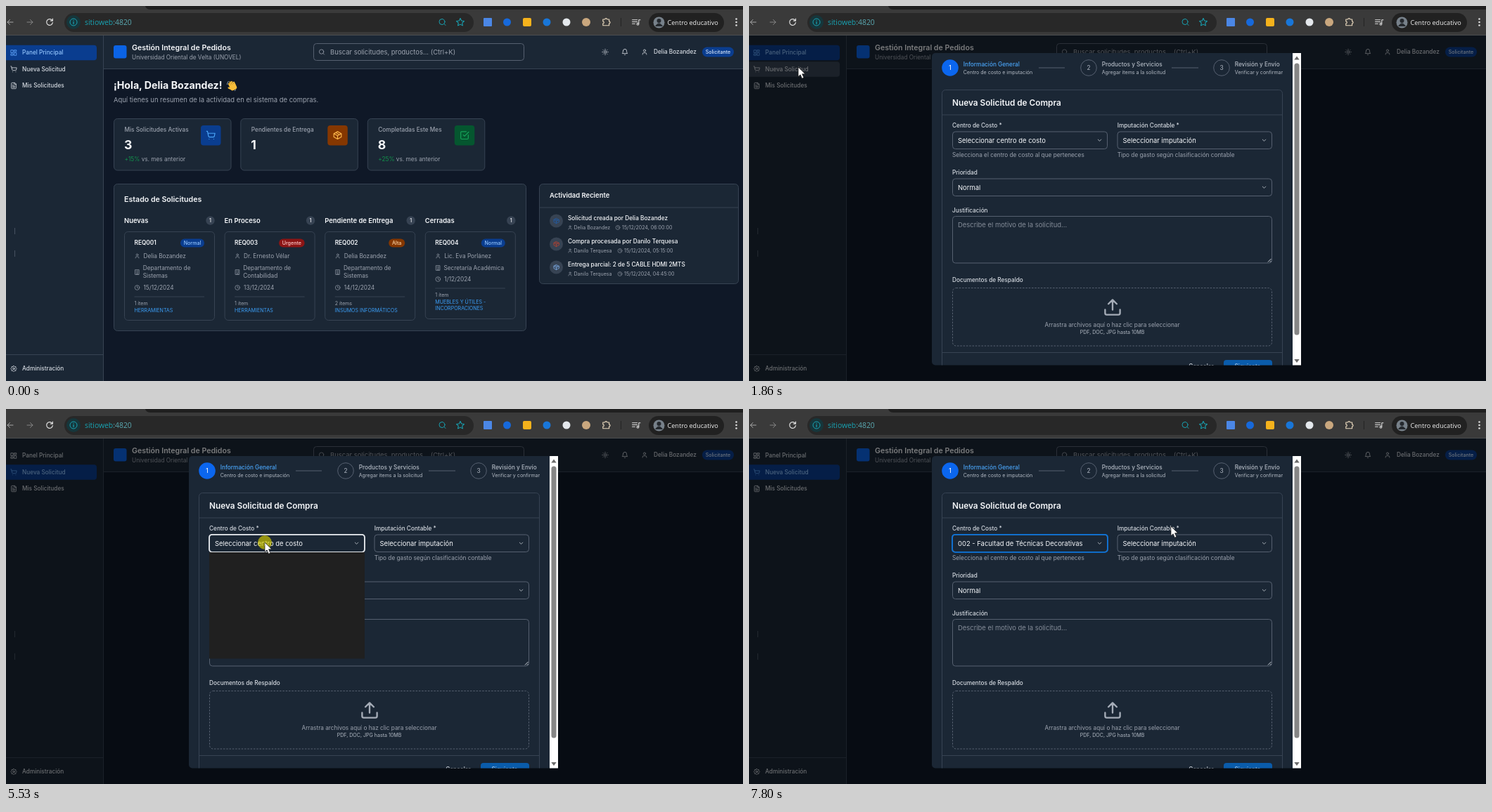
An HTML page for the animation above (8 s loop, 1048 by 534 pixels).

```html
<!DOCTYPE html>
<html lang="es">
<head>
<meta charset="utf-8">
<title>Panel de solicitudes</title>
<style>
  html, body { margin: 0; width: 100%; height: 100%; overflow: hidden; background: #0f1827; }
  svg { display: block; width: 100vw; height: 100vh; }
  text { font-family: Inter, sans-serif; white-space: pre; }
  .chrome text { font-family: "Open Sans", "Noto Sans", sans-serif; }
</style>
</head>
<body>
<svg id="stage" viewBox="0 0 1048 534"></svg>
<script>
const LOOP = 8000;
const PANEL = '#1b2735', LINE = '#374353', FIELD = '#566070', WHITE = '#f5f7fa', SOFT = '#d5dae1',
  GRAY = '#9ca3af', BLUE = '#0a3d8f', SKY = '#93c5fd', LINK = '#3b9df5', BROWN = '#853700', TEAL = '#18a3b3';
const XS = 7.08, SM = 8.26, MD = 9.44, LG = 10.62, XL = 11.8;
const USER = 'Delia Bozandez', BUYER = 'Danilo Terquesa', FACULTY = '002 - Facultad de Técnicas Decorativas';

// Line icons on a 24-unit grid.
const ICONS = {
  grid: 'M3 3h7v9H3zM14 3h7v5h-7zM14 12h7v9h-7zM3 16h7v5H3z',
  cart: 'M2 2h2l2.7 12.4a2 2 0 0 0 2 1.6h9.8a2 2 0 0 0 2-1.6L22 7H5.1M8 21h.1M19 21h.1',
  file: 'M15 2H6a2 2 0 0 0-2 2v16a2 2 0 0 0 2 2h12a2 2 0 0 0 2-2V7zM14 2v5h6M8 9h2M8 13h8M8 17h8',
  gear: 'M12 2l3 3h4v4l3 3-3 3v4h-4l-3 3-3-3H5v-4l-3-3 3-3V5h4zM15 12a3 3 0 1 1-6 0 3 3 0 0 1 6 0z',
  search: 'M19 11a8 8 0 1 1-16 0 8 8 0 0 1 16 0zM21 21l-4.3-4.3',
  sun: 'M16 12a4 4 0 1 1-8 0 4 4 0 0 1 8 0zM12 2v2M12 20v2M2 12h2M20 12h2M5 5l1.4 1.4M17.6 17.6L19 19M6.4 17.6L5 19M19 5l-1.4 1.4',
  bell: 'M6 8a6 6 0 0 1 12 0c0 7 3 9 3 9H3s3-2 3-9M10.3 21a1.9 1.9 0 0 0 3.4 0',
  user: 'M19 21v-2a4 4 0 0 0-4-4H9a4 4 0 0 0-4 4v2M16 7a4 4 0 1 1-8 0 4 4 0 0 1 8 0z',
  box: 'M21 8l-9-5-9 5v8l9 5 9-5zM3.3 8l8.7 5 8.7-5M12 21v-8M7.5 5.5l9 5',
  check: 'M21 11v8a2 2 0 0 1-2 2H5a2 2 0 0 1-2-2V5a2 2 0 0 1 2-2h11M9 11l3 3L22 4',
  building: 'M4 2h16v20H4zM9 22v-4h6v4M8 6h.1M12 6h.1M16 6h.1M8 10h.1M12 10h.1M16 10h.1M8 14h.1M12 14h.1M16 14h.1',
  clock: 'M22 12a10 10 0 1 1-20 0 10 10 0 0 1 20 0zM12 6v6l4 2',
  upload: 'M21 15v4a2 2 0 0 1-2 2H5a2 2 0 0 1-2-2v-4M17 8l-5-5-5 5M12 3v12',
  chevron: 'M6 9l6 6 6-6',
  back: 'M20 12H4m7 7l-7-7 7-7',
  forward: 'M4 12h16m-7-7l7 7-7 7',
  reload: 'M20 13a8 8 0 1 1-2.3-6.7L20 8.5M20 3v5.5h-5.5',
  star: 'M12 2l3.1 6.3 6.9 1-5 4.9 1.2 6.8-6.2-3.2L5.8 21 7 14.2 2 9.3l6.9-1z',
  list: 'M2 6h13M2 11h13M2 16h7M19 17V6h4M19 17a2.5 2.5 0 1 1-5 0 2.5 2.5 0 0 1 5 0z',
  puzzle: 'M4 6h5a2.5 2.5 0 0 1 5 0h5v5a2.5 2.5 0 0 1 0 5v5H4v-5a2.5 2.5 0 0 0 0-5z',
};

const rect = (x, y, w, h, fill, r = 0, stroke = 'none', more = '') =>
  `<rect x="${x}" y="${y}" width="${w}" height="${h}" rx="${r}" fill="${fill}" stroke="${stroke}" ${more}/>`;
const circle = (x, y, r, fill, stroke = 'none') => `<circle cx="${x}" cy="${y}" r="${r}" fill="${fill}" stroke="${stroke}"/>`;
const path = (d, stroke, width = 1, fill = 'none') => `<path d="${d}" stroke="${stroke}" stroke-width="${width}" fill="${fill}"/>`;
const hline = (x, y, w, color = LINE) => path(`M${x} ${y}h${w}`, color);
// y is the middle of the capitals
const text = (x, y, size, str, fill = GRAY, weight = 400, anchor = 'start') =>
  `<text x="${x}" y="${y + size * .36}" font-size="${size}" font-weight="${weight}" fill="${fill}" text-anchor="${anchor}">${str}</text>`;
const icon = (name, x, y, size, color, width = 2) =>
  `<path transform="translate(${x - size / 2} ${y - size / 2}) scale(${size / 24})" d="${ICONS[name]}" fill="none" stroke="${color}" stroke-width="${width}" stroke-linecap="round" stroke-linejoin="round"/>`;
const group = (id, body, more = '') => `<g id="${id}" ${more}>${body}</g>`;
const badge = (right, y, w, label, fill, color, h = 12) =>
  rect(right - w, y - h / 2, w, h, fill, h / 2) + text(right - w / 2, y, XS, label, color, 500, 'middle');

function browserBar() {
  return `<g class="chrome">` + rect(0, 0, 1048, 42, '#3a3a3a') + rect(0, 0, 1048, 5, '#1f1f1f') +
    path('M0 5V1q0-1 3-1H198q1 5 8 5z', 'none', 0, '#3a3a3a') + rect(0, 41, 1048, 1, '#4a4d50') +
    icon('back', 6, 23, 12, '#a5a5a5') + icon('forward', 34, 23, 12, '#858585') + icon('reload', 62, 23, 13, '#dedede', 2.3) +
    rect(83, 10, 582, 27, '#282828', 13.5) + circle(96, 23, 10, '#16363b') + circle(96, 23, 5, 'none', TEAL) +
    path('M96 22v4M96 20v1', TEAL, 1.2) + text(112, 23.5, 10.4, 'sitioweb<tspan fill="#5aa9b2">:4820</tspan>', TEAL) +
    icon('search', 620.5, 23, 12, TEAL) + icon('star', 646, 23, 13, TEAL) +
    rect(679, 17, 12, 12, '#4b87e6', 1) + circle(712.5, 23, 5.5, '#1769db') + rect(735, 17, 12, 12, '#f5b21c', 2) +
    circle(769, 23, 5.5, '#1976d8') + circle(797, 23, 5.5, '#e4e8ec') + circle(825, 23, 6, '#c9a77e') +
    icon('puzzle', 853.5, 22.5, 14, '#e8d7bd') + rect(874, 17, 1, 12, '#242424') + icon('list', 896, 23, 13, '#dedede') +
    rect(914, 10, 107, 27, '#212121', 13.5) + circle(928.5, 23.5, 8, '#77818a') + circle(928.5, 21, 3, '#25292e') +
    path('M923 29q5.5-9 11 0z', 'none', 0, '#25292e') + text(940.5, 23.5, 9.1, 'Centro educativo', '#f0f0f0', 500) +
    [18.5, 23, 27.5].map(y => circle(1038.5, y, 1.3, '#dedede')).join('') + '</g>';
}

const NAV = [['grid', 'Panel Principal', 66.5], ['cart', 'Nueva Solicitud', 90], ['file', 'Mis Solicitudes', 113.5]];
function sidebar() {
  const row = (name, label, y, color, tone = color) => icon(name, 11, y, 10, tone) + text(23, y, SM, label, color, 500);
  return rect(0, 42, 138.5, 492, PANEL) + path('M138.5 42V534', LINE) +
    NAV.map(([name, label, y], i) =>
      group('hover' + i, rect(-5, y - 10.7, 134, 21.4, LINE, 4)) + group('idle' + i, row(name, label, y, SOFT)) +
      group('active' + i, rect(-5, y - 10.7, 134, 21.4, BLUE, 4) + row(name, label, y, SKY, '#60a5fa'))).join('') +
    path('M12.5 316v9M12.5 348v9', '#465160') + hline(0, 496.5, 138) + row('gear', 'Administración', 516.5, SOFT);
}

function header() {
  return rect(139, 42, 909, 47, PANEL) + hline(139, 89.5, 909) + rect(153, 56, 18.5, 18.5, '#0b63e5', 3) +
    text(179, 59.5, LG, 'Gestión Integral de Pedidos', WHITE, 600) + text(179, 73.5, SM, 'Universidad Oriental de Velta (UNOVEL)') +
    rect(437.5, 53.5, 299, 24, PANEL, 4, FIELD) + icon('search', 449, 65.5, 9.5, GRAY) +
    text(461, 65.5, MD, 'Buscar solicitudes, productos... (Ctrl+K)') +
    icon('sun', 852, 65.5, 10, SOFT) + icon('bell', 880, 65.5, 10, SOFT) + icon('user', 908, 65.5, 9.5, SOFT) +
    text(921, 65.5, SM, USER, SOFT, 500) + badge(1035, 65.5, 45, 'Solicitante', BLUE, '#dbeafe', 14);
}

function statCard(x, label, value, change, name, fill, color) {
  return rect(x, 160.5, 166.5, 73.5, PANEL, 5, LINE) + text(x + 15, 176, SM, label, GRAY, 500) +
    text(x + 14.5, 198, 17.7, value, WHITE, 700) + rect(x + 123.5, 170, 28.5, 28.5, fill, 4) + icon(name, x + 137.7, 184.2, 14.2, color) +
    (change && text(x + 15, 218, SM, `<tspan fill="#12924c">${change}</tspan> vs. mes anterior`));
}

function requestColumn(i, title, [code, level, levelWidth, fill, color], person, department, date, items, category) {
  const x = 168 + 142.6 * i, tx = x + 27.5, shift = department.length > 1 ? 0 : -12;
  const lines = (list, y, step, draw) => list.map((s, k) => draw(s, y + k * step)).join('');
  return text(x, 305.5, MD, title, WHITE, 600) + circle(x + 122.5, 305.5, 6.2, LINE) + text(x + 122.5, 305.5, XS, '1', WHITE, 500, 'middle') +
    rect(x + .5, 321.5, 128, shift ? 124 : 126, PANEL, 5, LINE) + text(x + 14.5, 337.5, SM, code, WHITE, 600) +
    badge(x + 114, 337.5, levelWidth, level, fill, color) +
    icon('user', x + 18.5, 356, 8, GRAY) + text(tx, 356, SM, person) +
    icon('building', x + 18.5, 379 + shift / 2, 8, GRAY) + lines(department, 373, 11.5, (s, y) => text(tx - .8, y, SM, s)) +
    icon('clock', x + 18.5, 401 + shift, 8, GRAY) + text(tx, 401 + shift, SM, date) + hline(x + 14.5, 414 + shift, 99.5) +
    text(x + 14.5, 423.7 + shift, XS, items) + lines(category, 433.3 + shift, 9.5, (s, y) => text(x + 14.5, y, XS, s, LINK));
}

function activity(y, title, person, color, clockX) {
  return circle(782.5, y + 4, 9.5, LINE) + icon('box', 782.5, y + 4, 9.5, color) + text(799, y, SM, title, WHITE, 500) +
    icon('user', 802, y + 13.5, 7, GRAY) + text(807.5, y + 13.5, XS, person) + icon('clock', clockX, y + 13.5, 7, GRAY);
}

function dashboard() {
  const normal = ['Normal', 34, BLUE, SKY];
  const dept = name => ['Departamento de', name];
  const hand = `<g transform="translate(322 114) rotate(-25)" stroke="#f7bd3a" stroke-width="2.2" stroke-linecap="round" fill="#f7bd3a">` +
    `<path d="M-3.2 0V-5M-.8 -1V-6.5M1.6 -1V-6M4 0V-4M-3.5 3L-6 0"/><rect x="-3.2" y="-1" width="7.2" height="6" rx="2"/></g>` +
    path('M314.5 112q0-3 2-5M327 119q0 0-2 2', '#8fa3b5');
  return text(153, 113, 14.16, `¡Hola, ${USER}!`, WHITE, 700) + hand +
    text(153, 134, MD, 'Aquí tienes un resumen de la actividad en el sistema de compras.') +
    statCard(153.5, 'Mis Solicitudes Activas', 3, '+15%', 'cart', BLUE, '#4aa5f8') +
    statCard(333.8, 'Pendientes de Entrega', 1, '', 'box', BROWN, '#fbb54a') +
    statCard(514.3, 'Completadas Este Mes', 8, '+25%', 'check', '#05562f', '#16a35a') +
    rect(153.5, 253.5, 586, 209, PANEL, 5, LINE) + text(168, 275.5, LG, 'Estado de Solicitudes', WHITE, 600) +
    requestColumn(0, 'Nuevas', ['REQ001', ...normal], USER, dept('Sistemas'), '15/12/2024', '1 ítem', ['HERRAMIENTAS']) +
    requestColumn(1, 'En Proceso', ['REQ003', 'Urgente', 36.5, '#8c1515', '#fecaca'], 'Dr. Ernesto Vélar', dept('Contabilidad'), '13/12/2024', '1 ítem', ['HERRAMIENTAS']) +
    requestColumn(2, 'Pendiente de Entrega', ['REQ002', 'Alta', 23, BROWN, '#fed7aa'], USER, dept('Sistemas'), '14/12/2024', '2 ítems', ['INSUMOS INFORMÁTICOS']) +
    requestColumn(3, 'Cerradas', ['REQ004', ...normal], 'Lic. Eva Porlánez', ['Secretaría Académica'], '1/12/2024', '1 ítem', ['MUEBLES Y ÚTILES -', 'INCORPORACIONES']) +
    rect(758.5, 253.5, 283, 142, PANEL, 5, LINE) + text(773, 270, MD, 'Actividad Reciente', WHITE, 600) + hline(758.5, 287, 283) +
    activity(302, `Solicitud creada por ${USER}`, USER, '#1f5fae', 870) + text(876, 315.5, XS, '15/12/2024, 06:00:00') +
    activity(335, `Compra procesada por ${BUYER}`, BUYER, '#c2412d', 873) + text(879, 348.5, XS, '15/12/2024, 05:15:00') +
    activity(368, 'Entrega parcial: 2 de 5 CABLE HDMI 2MTS', BUYER, '#7fb2f0', 873) + text(879, 381.5, XS, '15/12/2024, 04:45:00');
}

function modal() {
  const step = (n, x, title, sub, on) => circle(x, 88, on ? 11.8 : 11.3, on ? '#0b66ee' : 'none', on ? 'none' : FIELD) +
    text(x, 88, SM, n, on ? WHITE : GRAY, 500, 'middle') + text(x + 18.7, 83.5, SM, title, on ? '#4aa5f8' : '#b3bac4', 500) + text(x + 18.7, 94, XS, sub, '#b3bac4');
  const label = (x, y, str) => text(x, y, SM, str, SOFT, 500);
  const select = (x, y, w, str, id) => rect(x, y, w, 24.5, PANEL, 4, FIELD) +
    `<g id="${id}">${text(x + 7.5, y + 12.2, MD, str, WHITE)}</g>` + icon('chevron', x + w - 11, y + 12.2, 9, SOFT);
  return rect(260, 67, 520, 444.5, PANEL, 5) + '<g clip-path="url(#modalClip)">' +
    step(1, 286, 'Información General', 'Centro de costo e imputación', true) + hline(412, 88, 37, FIELD) +
    step(2, 483, 'Productos y Servicios', 'Agregar ítems a la solicitud') + hline(601, 88, 38, FIELD) +
    step(3, 672, 'Revisión y Envío', 'Verificar y confirmar') +
    rect(274.5, 119.5, 484, 420, 'none', 5, LINE) + text(289, 137.5, XL, 'Nueva Solicitud de Compra', WHITE, 600) + hline(274.5, 155, 484) +
    label(289, 170.5, 'Centro de Costo *') + label(523.7, 170.5, 'Imputación Contable *') +
    select(289.5, 179, 220, 'Seleccionar centro de costo', 'costCenter') + select(524, 179, 219.5, 'Seleccionar imputación', 'account') +
    text(289, 212, SM, 'Selecciona el centro de costo al que perteneces') + text(523.7, 212, SM, 'Tipo de gasto según clasificación contable') +
    label(289, 237.5, 'Prioridad') + select(289.5, 246, 454, 'Normal', 'priority') +
    label(289, 291, 'Justificación') + rect(289.5, 299.5, 454, 66.5, PANEL, 4, FIELD) + path('M738 364.5l4.5-4.5M741 364.5l1.5-1.5', SOFT) +
    text(297, 311.5, MD, 'Describe el motivo de la solicitud...', '#858d99') +
    label(289, 390, 'Documentos de Respaldo') + rect(289.5, 401.5, 454, 82.5, 'none', 5, FIELD, 'stroke-dasharray="2.5 1.8"') +
    icon('upload', 517, 429, 28.3, '#a5acb7') + text(516.5, 454, SM, 'Arrastra archivos aquí o haz clic para seleccionar', GRAY, 400, 'middle') +
    text(516.5, 464.5, XS, 'PDF, DOC, JPG hasta 10MB', '#b3bac4', 400, 'middle') + hline(274.5, 493.5, 484) +
    text(643, 513.5, SM, 'Cancelar', SOFT, 500, 'middle') + rect(675, 504, 69, 24, '#0a5cab', 4) + text(709, 513.5, SM, 'Siguiente', '#a9c9ea', 500, 'middle') +
    '</g>' + rect(773, 67, 12, 444.5, '#fff') + rect(775.5, 81.5, 7, 387, '#868686', 3.5) +
    path('M779 71.5l3.7 5h-7.4zM779 508l3.7-5h-7.4z', 'none', 0, '#6b6b6b') +
    `<g id="ring">${rect(289, 178.8, 221, 25, 'none', 4, 'inherit', 'stroke-width="1.8"')}</g>`;
}

const ROW = 18.73, LIST_TOP = 205;
const OPTIONS = ['Seleccionar centro de costo', '001 - Facultad de Panadería', '>001001 - Departamento de Sistemas', '>001002 - Departamento de Civil',
  FACULTY, '>002001 - Departamento de Contabilidad', '003 - Rectorado', '>003001 - Secretaría Académica'];
function optionList() {
  return rect(289.5, 204.5, 220, 150.5, PANEL, 0, '#7d8693') + rect(290, 0, 219, ROW, '#0a6bd8', 0, 'none', 'id="choice"') +
    OPTIONS.map((label, i) => {
      const y = LIST_TOP + ROW * (i + .5), child = label[0] === '>';
      return (child ? path(`M301.3 ${y - 6}v6.3h9`, WHITE) : '') +
        text(child ? 312.5 : 297, y, MD, label.replace('>', ''), i ? WHITE : '#747d89');
    }).join('');
}

const $ = id => document.getElementById(id);
$('stage').innerHTML = '<clipPath id="modalClip"><rect x="260" y="67" width="513" height="444.5"/></clipPath>' +
  rect(0, 0, 1048, 534, '#0f1827') + group('dashboard', dashboard()) + sidebar() + header() +
  group('modal', rect(0, 42, 1048, 492, '#000', 0, 'none', 'opacity=".5"') + modal() +
    group('blank', rect(289, 204, 221, 151.5, '#202020')) + group('options', optionList())) +
  browserBar() + group('click', circle(0, 0, 10, '#d8d000'), 'opacity=".65"') +
  group('cursor', path('M0 0V13.6L3.1 10.8 5.4 16.2 7.9 15.1 5.6 9.8H9.9Z', '#111', .7, '#fff'));

// [time, x, y] of the pointer
const TRAIL = [[400, 946, 525], [800, 420, 330], [1140, 82, 112], [1260, 70, 91], [1500, 70, 87], [2380, 70, 87], [2900, 374, 150], [3180, 357, 175],
  [3250, 357, 175], [3520, 350, 163], [3850, 320, 168], [4120, 320, 168], [4480, 289, 167], [4860, 350, 170], [4990, 350, 170],
  [5350, 368, 190], [5600, 368, 190], [5740, 372, 204], [6100, 390, 345], [6270, 386, 307], [6600, 386, 290], [6750, 386, 290],
  [7050, 906, 240], [7460, 614, 180], [7530, 614, 180], [7800, 600, 167], [8000, 600, 167]];
const ramp = (t, from, to) => Math.min(1, Math.max(0, (t - from) / (to - from)));
const during = (t, from, to) => t >= from && t < to;

function pointerAt(t) {
  const i = Math.max(1, TRAIL.findIndex(p => p[0] > t)), [t0, x0, y0] = TRAIL[i - 1], [t1, x1, y1] = TRAIL[i];
  const p = ramp(t, t0, t1), s = p * p * (3 - 2 * p);
  return [x0 + (x1 - x0) * s, y0 + (y1 - y0) * s];
}

const show = (id, on) => $(id).setAttribute('display', on ? 'inline' : 'none');
const fade = (id, opacity) => $(id).setAttribute('opacity', opacity);

function render(t) {
  const open = t >= 1860, [x, y] = pointerAt(t), place = `translate(${x} ${y})`;
  show('dashboard', !open);
  show('modal', open);
  show('cursor', t >= 460);
  show('click', during(t, 5450, 5600) || during(t, 6680, 6800));
  $('cursor').setAttribute('transform', place);
  $('click').setAttribute('transform', place);

  const swap = ramp(t, 1920, 2090);
  [1 - swap, swap, 0].forEach((on, i) => { fade('active' + i, on); fade('idle' + i, 1 - on); });
  fade('hover0', 0);
  fade('hover1', ramp(t, 1300, 1450) * (1 - swap));
  fade('hover2', ramp(t, 1110, 1200) * (1 - ramp(t, 1230, 1320)));

  show('ring', t >= 5430);
  $('ring').setAttribute('stroke', t < 5600 ? '#e8ebef' : '#0d76dd');
  show('blank', during(t, 5500, 5600));
  show('options', during(t, 5600, 6760));
  const row = Math.min(7, Math.floor((pointerAt(t - 80)[1] - LIST_TOP) / ROW));
  show('choice', row > 0);
  $('choice').setAttribute('y', LIST_TOP + ROW * row);
  $('costCenter').firstChild.textContent = t < 6740 ? OPTIONS[0] : FACULTY;
}

function tick() {
  render(performance.now() % LOOP);
  requestAnimationFrame(tick);
}
tick();
</script>
</body>
</html>
```
